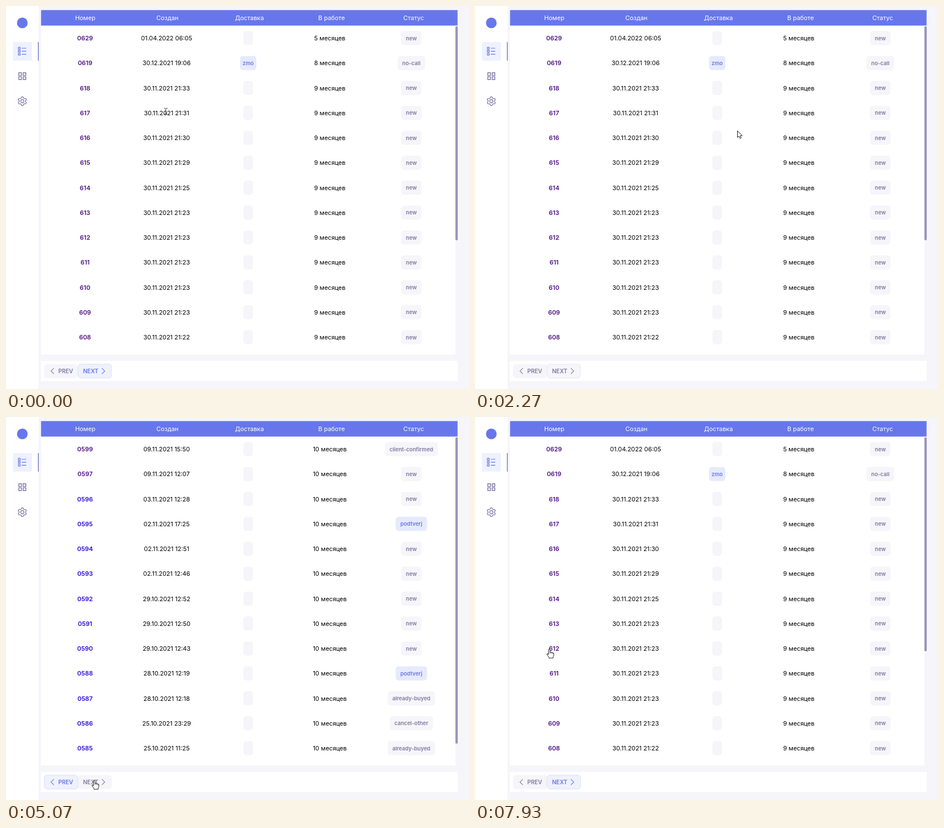
Animation, 823 px wide and 680 px high, one loop 8 s. Source, as an HTML page with a canvas:

```html
<!DOCTYPE html>
<html lang="ru">
<head>
<meta charset="utf-8">
<title>Orders</title>
<style>
html, body { margin: 0; width: 100%; height: 100%; overflow: hidden; background: #f5f5fa; }
canvas { display: block; width: 823px; height: 680px; }
</style>
</head>
<body>
<canvas id="stage"></canvas>
<script>
const W = 823, H = 680, STEP = 200 / 3, STEPS = 120;
const BLUE = '#6777eb', PALE = '#f5f5fa', GREY = '#7f799e';
const ROW_Y = 57, ROW_H = 44.25;
const COLS = [140.5, 285.5, 430.5, 575.5, 720.5];
const HEADS = ['Номер', 'Создан', 'Доставка', 'В работе', 'Статус'];

const canvas = document.getElementById('stage');
const ctx = canvas.getContext('2d');
const dpr = window.devicePixelRatio || 1;
canvas.width = W * dpr;
canvas.height = H * dpr;

// Each row: number, created, age in months, status
const first = [
  ['0629', '01.04.2022 06:05', '5 месяцев', 'new'],
  ['0619', '30.12.2021 19:06', '8 месяцев', 'no-call'],
  ...[33, 31, 30, 29, 25, 23, 23, 23, 23, 23, 22].map((min, i) =>
    [`${618 - i}`, `30.11.2021 21:${min}`, '9 месяцев', 'new'])
];
const second = [
  ['0599', '09.11.2021 15:50', 'client-confirmed'],
  ['0597', '09.11.2021 12:07', 'new'],
  ['0596', '03.11.2021 12:28', 'new'],
  ['0595', '02.11.2021 17:25', 'podtverj'],
  ['0594', '02.11.2021 12:51', 'new'],
  ['0593', '02.11.2021 12:46', 'new'],
  ['0592', '29.10.2021 12:52', 'new'],
  ['0591', '29.10.2021 12:50', 'new'],
  ['0590', '29.10.2021 12:43', 'new'],
  ['0588', '28.10.2021 12:19', 'podtverj'],
  ['0587', '28.10.2021 12:18', 'already-buyed'],
  ['0586', '25.10.2021 23:29', 'cancel-other'],
  ['0585', '25.10.2021 11:25', 'already-buyed']
].map(([id, date, status]) => [id, date, '10 месяцев', status]);

// Loading periods as [status bar shown, table hidden, table back], in steps
const LOADS = [[18, 22, 34], [61, 61, 69], [88, 88, 96]];

// Pointer key points: step, x, y
const TRACK = [
  [0, 284, 187], [7, 47, 1], [8, 40, -40], [21, 330, -40], [27, 466.5, 221.5],
  [43, 466.5, 221.5], [49, 190, 440], [53, 41, 600], [54, 80, 646], [56, 144, 639],
  [57, 152, 641], [58, 159.5, 644], [75, 159.5, 644], [76, 157, 645], [83, 107, 646],
  [107, 107, 646], [112, 165, 590], [119, 132, 412], [120, 132, 412]
];

const ARROW = new Path2D('M0 0V12L2.8 9.5L4.6 13.6L6.7 12.7L4.9 8.7H8.6Z');
const HAND = new Path2D('M-1.3 10V1.4Q-1.3 0 0 0T1.3 1.4V5.6Q3.6 4.6 3.9 6Q6 5.2 6.3 6.7' +
  'Q8 6.6 8 8V11Q8 12.5 6.8 14V16H-.6V14.5L-4 9.8Q-4.6 8 -3 8Z');
const BEAM = new Path2D('M-3 -5.5H-1L0 -4.5L1 -5.5H3M0 -4.5V4M-3 5H-1L0 4L1 5H3');

const clamp = v => Math.max(0, Math.min(1, v));
const font = (size, weight) => `${weight} ${size}px Inter, sans-serif`;
const BODY = font(10.9, 400), BOLD = font(10.9, 600);
const TAG = font(9.6, 600), LABEL = font(10, 600);

function rect(x, y, w, h, fill, r = 0) {
  ctx.beginPath();
  ctx.roundRect(x, y, w, h, r);
  ctx.fillStyle = fill;
  ctx.fill();
}

function text(str, x, y, fill, face, align = 'center') {
  ctx.font = face;
  ctx.textAlign = align;
  ctx.fillStyle = fill;
  ctx.fillText(str, x, y);
}

function stroke(path, color, width) {
  ctx.strokeStyle = color;
  ctx.lineWidth = width;
  ctx.stroke(path);
}

function pill(label, x, y, blue, width) {
  ctx.font = TAG;
  const w = width || ctx.measureText(label).width + 16.5;
  rect(x - w / 2, y - 12.5, w, 25, blue ? '#e6eafc' : PALE, 5);
  text(label, x, y + 3.5, blue ? BLUE : GREY, TAG);
}

function sidebar() {
  rect(0, 0, 58, H, '#fff');
  rect(19.5, 20.5, 19, 19, BLUE, 9.5);
  rect(12.5, 64, 33.5, 33, '#eef1fe', 2);
  rect(56.8, 64, 1.3, 33, '#6070c8');

  const list = new Path2D(), grid = new Path2D(), gear = new Path2D();
  for (let i = 0; i < 3; i++) {
    const y = 75 + i * 5.3;
    list.rect(22, y - 1.6, 3.2, 3.2);
    list.moveTo(28, y);
    list.lineTo(36, y);
  }
  for (let i = 0; i < 4; i++) grid.rect(22.7 + i % 2 * 7.8, 118.5 + (i >> 1) * 7.2, 4.8, 4.8);
  for (let i = 0; i < 72; i++) {
    const a = i * Math.PI / 36;
    const r = 6.7 + Math.max(-1, Math.min(1, 1.8 * Math.cos(6 * a)));
    gear.lineTo(29 + r * Math.sin(a), 169 - r * Math.cos(a));
  }
  gear.closePath();
  gear.moveTo(31.8, 169);
  gear.arc(29, 169, 2.8, 0, 7);
  stroke(list, BLUE, 1.2);
  stroke(grid, '#7872a0', 1.3);
  stroke(gear, '#7872a0', 1.2);
}

function table(rows, thumbEnd) {
  const isFirst = rows === first;
  rect(62.3, 7.3, 740.4, 611.7, '#fff');
  rect(62.3, 7.3, 740.4, 27.4, BLUE);
  HEADS.forEach((head, i) => text(head, 141 + i * 145.9, 25, '#fff', BODY));
  rect(799, 34.7, 4, 584.3, PALE);
  rect(798.8, 36, 4.2, thumbEnd - 36, '#9a96b9', 2);

  rows.forEach(([id, date, age, status], i) => {
    const y = ROW_Y + i * ROW_H;
    const visited = isFirst || i < 2;
    text(id, COLS[0], y + 4, visited ? '#4f1284' : '#2a0be0', BOLD);
    text(date, COLS[1], y + 4, '#000', BODY);
    if (isFirst && i === 1) pill('zmo', COLS[2], y, true, 29);
    else pill('', COLS[2], y, false, 17);
    text(age, COLS[3], y + 4, '#000', BODY);
    pill(status, COLS[4], y, status === 'podtverj');
  });
}

// p runs from disabled (0) to enabled (1)
function button(x, label, dir, p, enabled, hover) {
  const labelX = dir < 0 ? x + 25 : x + 9;
  const tip = dir < 0 ? x + 12 : x + 47.5;
  const chevron = new Path2D();
  chevron.moveTo(tip - dir * 5, 643.2);
  chevron.lineTo(tip, 648.2);
  chevron.lineTo(tip - dir * 5, 653.2);
  const border = new Path2D();
  border.roundRect(x + .3, 636, 59.2, 24.5, 5);

  const layer = (bg, fg, edge) => {
    rect(x, 635.7, 59.8, 25.1, bg, 5);
    if (edge) stroke(border, edge, .8);
    text(label, labelX, 652, fg, LABEL, 'left');
    stroke(chevron, fg, 1.1);
  };
  layer(PALE, GREY, enabled && '#e5e5ee');
  if (p > 0) {
    ctx.globalAlpha = p;
    layer(hover ? '#dfe4fc' : '#eff1fd', BLUE, !hover && '#d9dffb');
    ctx.globalAlpha = 1;
  }
}

function pointerAt(k) {
  const i = Math.max(1, TRACK.findIndex(p => p[0] >= k));
  const [k0, x0, y0] = TRACK[i - 1], [k1, x1, y1] = TRACK[i];
  const f = (k - k0) / (k1 - k0);
  return [x0 + (x1 - x0) * f, y0 + (y1 - y0) * f];
}

function pointer(x, y, overButtons, loading) {
  const offset = Math.abs(y - ROW_Y - ROW_H * Math.round((y - ROW_Y) / ROW_H));
  const onRow = !loading && y > 40 && y < 600 && offset < 7;
  ctx.save();
  ctx.translate(x, y);
  if (onRow && Math.abs(x - COLS[1]) < 45) {
    stroke(BEAM, '#333', 1);
  } else {
    const shape = overButtons || onRow && Math.abs(x - COLS[0]) < 14 ? HAND : ARROW;
    ctx.fillStyle = '#fff';
    ctx.fill(shape);
    stroke(shape, '#222', 1);
    if (shape === HAND) stroke(new Path2D('M1.3 5.5V8M3.9 6V8.4M6.3 6.7V8.8'), '#222', .8);
  }
  ctx.restore();
}

function statusBar(alpha) {
  ctx.globalAlpha = alpha;
  rect(0, 665.5, 273, 14.5, '#07040f', [0, 2, 0, 0]);
  text('Ожидание localhost...', 3, 676, '#fff', '400 7.9px "Open Sans", "Noto Sans", sans-serif', 'left');
  ctx.globalAlpha = 1;
}

function draw(k) {
  ctx.setTransform(dpr, 0, 0, dpr, 0, 0);
  rect(0, 0, W, H, PALE);
  sidebar();

  const loading = LOADS.some(([, from, to]) => k >= from && k < to);
  const pageTwo = k >= 69 && k < 88;
  if (loading) text('Loading...', 62, 11, '#222', BODY, 'left');
  else table(pageTwo ? second : first, pageTwo ? 580 : 416);

  const [x, y] = pointerAt(k);
  const overButtons = y > 636 && x > 68 && x < 188;
  const ramp = from => clamp((k - from) / 3);
  const prev = ramp(61) - ramp(88);
  const next = k < 22 ? 1 : ramp(34) - ramp(61) + ramp(88);
  const onSecond = k >= 61 && k < 88;
  rect(62, 630, 741, 36, '#fff');
  button(68, 'PREV', -1, prev, onSecond, overButtons && x < 128);
  button(128, 'NEXT', 1, next, !onSecond && (k < 22 || k >= 34), overButtons && x >= 128);

  for (const [from, , to] of LOADS) {
    if (k >= from && k < to) statusBar(clamp((to - k) / 3.5) ** 3);
  }
  pointer(x, y, overButtons, loading);
}

function tick(now) {
  draw(Math.floor((now + 3.5) / STEP) % STEPS);
  requestAnimationFrame(tick);
}
requestAnimationFrame(tick);
</script>
</body>
</html>
```
